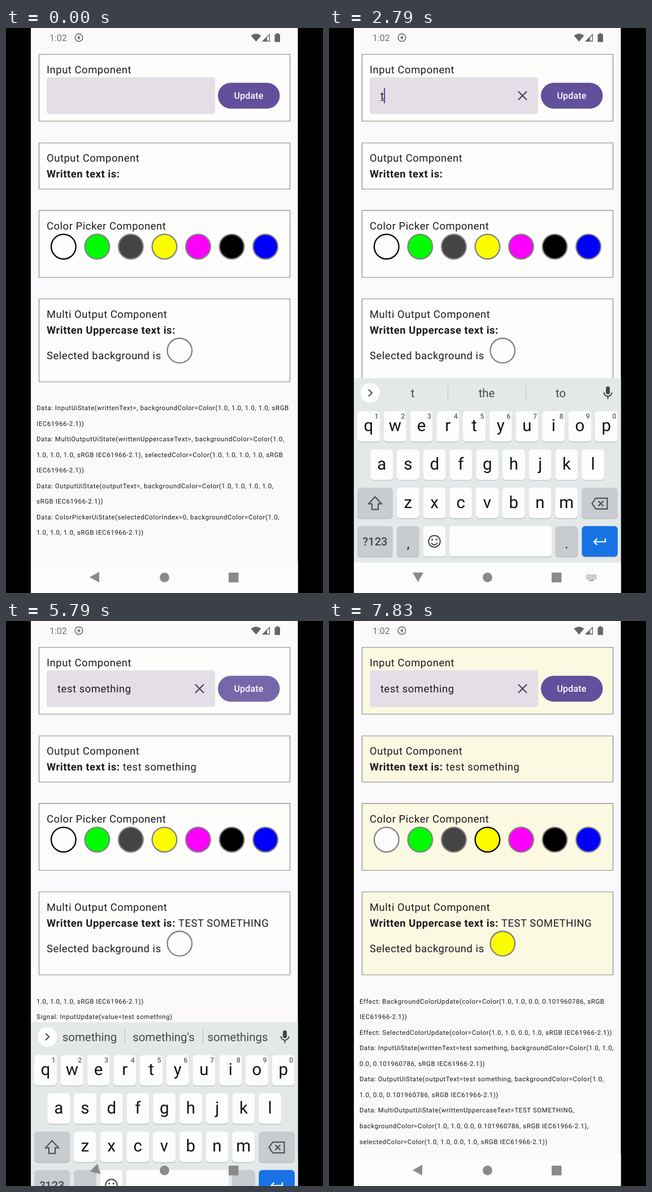
These frames come from a looping animation (561x998 px, 8000 ms). An HTML page with a canvas:

```html
<!DOCTYPE html>
<html lang="en">
<head>
<meta charset="utf-8">
<title>Component demo</title>
<style>
  html, body { margin: 0; width: 100%; height: 100%; overflow: hidden; background: #000; }
  canvas { display: block; }
</style>
</head>
<body>
<canvas id="stage" width="561" height="998"></canvas>
<script>
const ctx = document.getElementById('stage').getContext('2d');
ctx.textRendering = 'geometricPrecision'; // fractional glyph advances

const LOOP = 8000;
const LEFT = 44, WIDTH = 472.5;
const INK = '#1b1a1d', PURPLE = '#62509d', ICON = '#44484b', NAV = '#8b8a8b';
const TYPED = 'test something';
const KEY_TIMES = [2710, 2810, 2920, 3000, 3110, 3300, 3370, 3440, 3520, 3900, 3980, 4060, 4130, 4210];
const FOCUS = 1085, UPDATED = 5540, PICKED = 7330;
const SWATCHES = ['#fdfdfd', '#00fc00', '#444444', '#fbfd00', '#fb00fb', '#000000', '#0000fb'];
const SUGGESTIONS = [
  [2750, 't', 'the', 'to'],
  [3050, 'test', 'tests', 'testing'],
  [3420, 's', 'a', 'so'],
  [3670, 'some', 'same', 'something'],
  [4250, 'something', "something's", 'somethings']
];
const TOUCHES = [[920, 1020, 200, 120], [5420, 5520, 430, 120], [7170, 7300, 290.5, 380.5]];

const LOG_START = `Data: InputUiState(writtenText=, backgroundColor=Color(1.0, 1.0, 1.0, 1.0, sRGB
IEC61966-2.1))
Data: MultiOutputUiState(writtenUppercaseText=, backgroundColor=Color(1.0,
1.0, 1.0, 1.0, sRGB IEC61966-2.1), selectedColor=Color(1.0, 1.0, 1.0, 1.0, sRGB
IEC61966-2.1))
Data: OutputUiState(outputText=, backgroundColor=Color(1.0, 1.0, 1.0, 1.0,
sRGB IEC61966-2.1))
Data: ColorPickerUiState(selectedColorIndex=0, backgroundColor=Color(1.0,
1.0, 1.0, 1.0, sRGB IEC61966-2.1))`.split('\n');

const LOG_UPDATED = `1.0, 1.0, 1.0, sRGB IEC61966-2.1))
Signal: InputUpdate(value=test something)
Data: InputUiState(writtenText=test something, backgroundColor=Color(1.0, 1.0,
1.0, 1.0, sRGB IEC61966-2.1))
Effect: InputUpdate(value=test something)
Data: MultiOutputUiState(writtenUppercaseText=TEST SOMETHING,
backgroundColor=Color(1.0, 1.0, 1.0, 1.0, sRGB IEC61966-2.1),
selectedColor=Color(1.0, 1.0, 1.0, 1.0, sRGB IEC61966-2.1))
Data: OutputUiState(outputText=test something, backgroundColor=Color(1.0,
1.0, 1.0, 1.0, sRGB IEC61966-2.1))`.split('\n');

const LOG_PICKED = `Effect: BackgroundColorUpdate(color=Color(1.0, 1.0, 0.0, 0.101960786, sRGB
IEC61966-2.1))
Effect: SelectedColorUpdate(color=Color(1.0, 1.0, 0.0, 1.0, sRGB IEC61966-2.1))
Data: InputUiState(writtenText=test something, backgroundColor=Color(1.0, 1.0,
0.0, 0.101960786, sRGB IEC61966-2.1))
Data: OutputUiState(outputText=test something, backgroundColor=Color(1.0,
1.0, 0.0, 0.101960786, sRGB IEC61966-2.1))
Data: MultiOutputUiState(writtenUppercaseText=TEST SOMETHING,
backgroundColor=Color(1.0, 1.0, 0.0, 0.101960786, sRGB IEC61966-2.1),
selectedColor=Color(1.0, 1.0, 0.0, 1.0, sRGB IEC61966-2.1))`.split('\n');

const progress = (t, start, length) => Math.max(0, Math.min(1, (t - start) / length));

function rect(x, y, w, h, fill, radius = 0) {
  ctx.beginPath();
  ctx.roundRect(x, y, w, h, radius);
  ctx.fillStyle = fill;
  ctx.fill();
}

function circle(x, y, r, fill, stroke, width = 2.3) {
  ctx.beginPath();
  ctx.arc(x, y, r, 0, 7);
  if (fill) { ctx.fillStyle = fill; ctx.fill(); }
  if (stroke) { ctx.strokeStyle = stroke; ctx.lineWidth = width; ctx.stroke(); }
}

function line(path, color, width = 2) {
  ctx.strokeStyle = color;
  ctx.lineWidth = width;
  ctx.stroke(new Path2D(path));
}

function shape(path, color) {
  ctx.fillStyle = color;
  ctx.fill(new Path2D(path));
}

// Draws text and returns its advance width.
function text(str, x, y, { size = 18.37, weight = 400, spacing = 0.574, color = INK, align = 'left' } = {}) {
  ctx.font = `${weight} ${size}px Roboto, sans-serif`;
  ctx.letterSpacing = spacing + 'px';
  ctx.textAlign = align;
  ctx.fillStyle = color;
  ctx.fillText(str, x, y);
  return ctx.measureText(str).width;
}

function labelled(label, value, y) {
  const width = text(label + ' ', 72, y, { weight: 700 });
  text(value, 72 + width, y);
}

function statusBar() {
  const gray = '#666567';
  text('1:02', 77, 23.2, { size: 16, spacing: 0, color: '#727173' });
  circle(129, 17, 6.8, null, gray, 1.5);
  shape('M130 12l-4 6h2.6l-.6 4 4-6h-2.6z', gray);
  shape('M433.5 13.5Q442.5 6.5 451.5 13.5L442.5 24z', gray);
  line('M454.5 23.2H466.3V11.4z', gray, 1.4);
  shape('M453.5 24H462V15.5z', gray);
  rect(475.5, 11, 9.5, 13.8, gray, 1.2);
  rect(478, 9.3, 4.5, 3, gray);
}

function cursorVisible(t) {
  const reset = [FOCUS, ...KEY_TIMES].filter(k => k <= t).pop();
  return reset !== undefined && (t - reset) % 1000 < 500;
}

function inputField(t) {
  rect(72, 87, 298, 65, '#e4dfe7', 4.6);
  const count = KEY_TIMES.filter(k => k <= t).length;
  const typed = TYPED.slice(0, count);
  const width = text(typed, 91, 125.5);
  if (count) {
    line('M335 112l15 15M350 112l-15 15', '#49454f', 2.2);
    const wordStart = count > 5 ? 5 : 0;
    if (count !== 5 && t < 5600) {
      const offset = ctx.measureText(typed.slice(0, wordStart)).width;
      rect(91 + offset, 127.3, width - offset, 1.1, INK);
    }
  }
  if (cursorVisible(t)) rect(90.4 + width, 106, 2.3, 27, PURPLE);
}

function page(t) {
  const updated = t >= UPDATED, picked = t >= PICKED;
  rect(LEFT, 0, WIDTH, 998, '#fbf9fb');
  rect(LEFT, 942, WIDTH, 56, '#fdfcfd');
  statusBar();

  for (const [top, bottom] of [[46.5, 164.5], [203, 284.5], [322.3, 440.5], [478.5, 625]]) {
    rect(58.5, top, 444, bottom - top, picked ? '#fbf9e1' : '#fdfefc');
    ctx.strokeStyle = '#898a88';
    ctx.lineWidth = 1.2;
    ctx.stroke();
  }

  text('Input Component', 72, 80);
  inputField(t);
  rect(375, 96.7, 109.5, 45.8, PURPLE, 22.9);
  const ripple = 0.13 * progress(t, 5460, 120) * (1 - progress(t, 5800, 180));
  if (ripple) rect(375, 96.7, 109.5, 45.8, `rgba(255,255,255,${ripple})`, 22.9);
  text('Update', 429.5, 125, { size: 16.07, weight: 500, spacing: 0.115, color: '#fdfcfd', align: 'center' });

  text('Output Component', 72, 236.3);
  labelled('Written text is:', updated ? TYPED : '', 263.8);

  text('Color Picker Component', 72, 355.6);
  SWATCHES.forEach((color, i) =>
    circle(101.8 + i * 59.55, 386.2, 21.8, color, i === (picked ? 3 : 0) ? '#000' : '#828282'));

  text('Multi Output Component', 72, 511.9);
  labelled('Written Uppercase text is:', updated ? TYPED.toUpperCase() : '', 539.5);
  text('Selected background is', 72, 585.4);
  circle(307.3, 569.8, 21.8, picked ? SWATCHES[3] : '#fdfdfd', '#828282');

  const log = picked ? LOG_PICKED : updated ? LOG_UPDATED : LOG_START;
  const top = updated ? 675.6 : 675;
  log.forEach((entry, i) => text(entry, 54, top + i * 27.55, { size: 11.48 }));
}

function key(x, y, w, fill = '#fdfdfd') {
  rect(x, y + 1.2, w, 54, '#b4b8bb', 6);
  rect(x, y, w, 54, fill, 6);
}

function letterRow(letters, firstCenter, y) {
  [...letters].forEach((letter, i) => {
    const x = firstCenter + i * 46.75;
    key(x - 20, y, 40);
    text(letter, x, y + 35.5, { size: 29.5, spacing: 0, color: '#111', align: 'center' });
  });
}

function toolbar() {
  line('M76 638.5l-6 6 6 6', ICON);
  circle(133.5, 642, 6, null, ICON, 2.2);
  line('M138 646.5l7.5 7.5', ICON, 2.6);
  line('M197 635.5h14.5q1.5 0 1.5 1.5v9.5l-7 7h-9q-1.5 0-1.5-1.5v-15q0-1.5 1.5-1.5zM206 653v-6.5h7M199 645q3 5 7 1', ICON);
  circle(201, 641.5, 1.4, ICON);
  circle(207.5, 641.5, 1.4, ICON);
  line('M268 640.5h-5.5q-2.5 0-2.5 2.5v4q0 2.5 2.5 2.5h4.3v-4.5h-3M273 639v11.7M278.5 650.7v-10.2h7M278.5 645.5h6', ICON, 2.6);
  line('M333 636h16.5v18.5H333zM337 642h9M337 646h9M337 650h6', ICON);
  rect(337, 634, 8.5, 4.5, ICON, 1);
  rect(382.5, 632, 1, 25, '#c6cbcd');
  for (const x of [418, 425, 432]) circle(x, 644.5, 2.4, ICON);
}

function suggestionBar(words) {
  line('M70 638.5l6 6-6 6', ICON);
  words.forEach((word, i) =>
    text(word, 148 + i * 131, 651.7, { size: 20.4, spacing: 0, color: '#44484a', align: 'center' }));
  rect(210, 631, 1, 27, '#b9bfc1');
  rect(348, 631, 1, 27, '#b9bfc1');
}

function keyboard(t) {
  const rising = 95 * (1 - progress(t, 1540, 170)) ** 2.2;
  const falling = 380 * progress(t, 5700, 200) ** 1.83;
  ctx.save();
  ctx.translate(0, rising + falling);
  rect(LEFT, 618.5, WIDTH, 326, '#e3e9e9');
  rect(LEFT, 944, WIDTH, 54, '#fdfcfd');

  circle(73, 644.5, 17.2, '#fdfdfd');
  const current = SUGGESTIONS.filter(s => s[0] <= t).pop();
  current ? suggestionBar(current.slice(1)) : toolbar();
  rect(490, 633, 7, 14, ICON, 3.5);
  line('M486.5 643.5a7 7 0 0 0 14 0M493.5 650.5v5', ICON);

  letterRow('qwertyuiop', 70, 676.8);
  [...'1234567890'].forEach((digit, i) =>
    text(digit, 84 + i * 46.75, 690.3, { size: 12.5, weight: 500, spacing: 0, color: '#5c6063', align: 'center' }));
  letterRow('asdfghjkl', 93.2, 744.4);
  letterRow('zxcvbnm', 139.7, 812);

  const gray = '#c8ccd1';
  key(50, 812, 63, gray);
  line('M81.5 828L70 840.5h6v10h11v-10h6z', ICON);
  key(447.5, 812, 63.5, gray);
  line('M465.5 840l6.5-9.5h20.5v19H472zM476.5 835.5l9 9M485.5 835.5l-9 9', ICON);

  key(50, 879.7, 63, gray);
  text('?123', 81.5, 914, { size: 20, weight: 500, spacing: 0, color: ICON, align: 'center' });
  key(120, 879.7, 40, gray);
  text(',', 140, 919, { size: 24, spacing: 0, color: '#222', align: 'center' });
  key(166.5, 879.7, 40);
  circle(186.5, 906.7, 10.3, null, ICON, 2);
  circle(182.7, 903.7, 1.6, ICON);
  circle(190.3, 903.7, 1.6, ICON);
  line('M181 909.5q5.5 7 11 0', ICON);
  key(213, 879.7, 181.5);
  key(400.5, 879.7, 40, gray);
  text('.', 420.5, 919, { size: 24, spacing: 0, color: '#222', align: 'center' });
  key(447.5, 879.7, 63.5, '#1873e4');
  line('M489 901.5v6h-20M474.5 902l-5.5 5.5 5.5 5.5', '#fff', 2.2);
  ctx.restore();
}

function navigation(t) {
  const turn = progress(t, 1510, 210) - progress(t, 5620, 210);
  ctx.save();
  ctx.translate(157.5, 970 - turn * 0.8);
  ctx.rotate(-turn * Math.PI / 2);
  shape('M-9.5 0L7.5-9.5v19z', NAV);
  ctx.restore();
  circle(280.5, 970.5, 8.4, NAV);
  rect(394, 962, 17.5, 17.3, NAV, 1.2);
  if (t >= 1540 && t < 5700) {
    for (let row = 0; row < 3; row++)
      for (let col = 0; col < 6; col++)
        rect(455.5 + col * 3.1, 965.5 + row * 3.1, 2, 2, NAV);
    rect(460, 974.8, 9, 2, NAV);
  }
}

function draw(t) {
  ctx.fillStyle = '#000';
  ctx.fillRect(0, 0, 561, 998);
  page(t);
  if (t >= 1540 && t < 5900) keyboard(t);
  navigation(t);
  for (const [start, end, x, y] of TOUCHES)
    if (t >= start && t < end) circle(x, y, 12.3, 'rgba(240,240,236,.6)', 'rgba(190,195,200,.45)', 1);
}

function frame() {
  draw(performance.now() % LOOP);
  requestAnimationFrame(frame);
}
frame();
</script>
</body>
</html>
```
